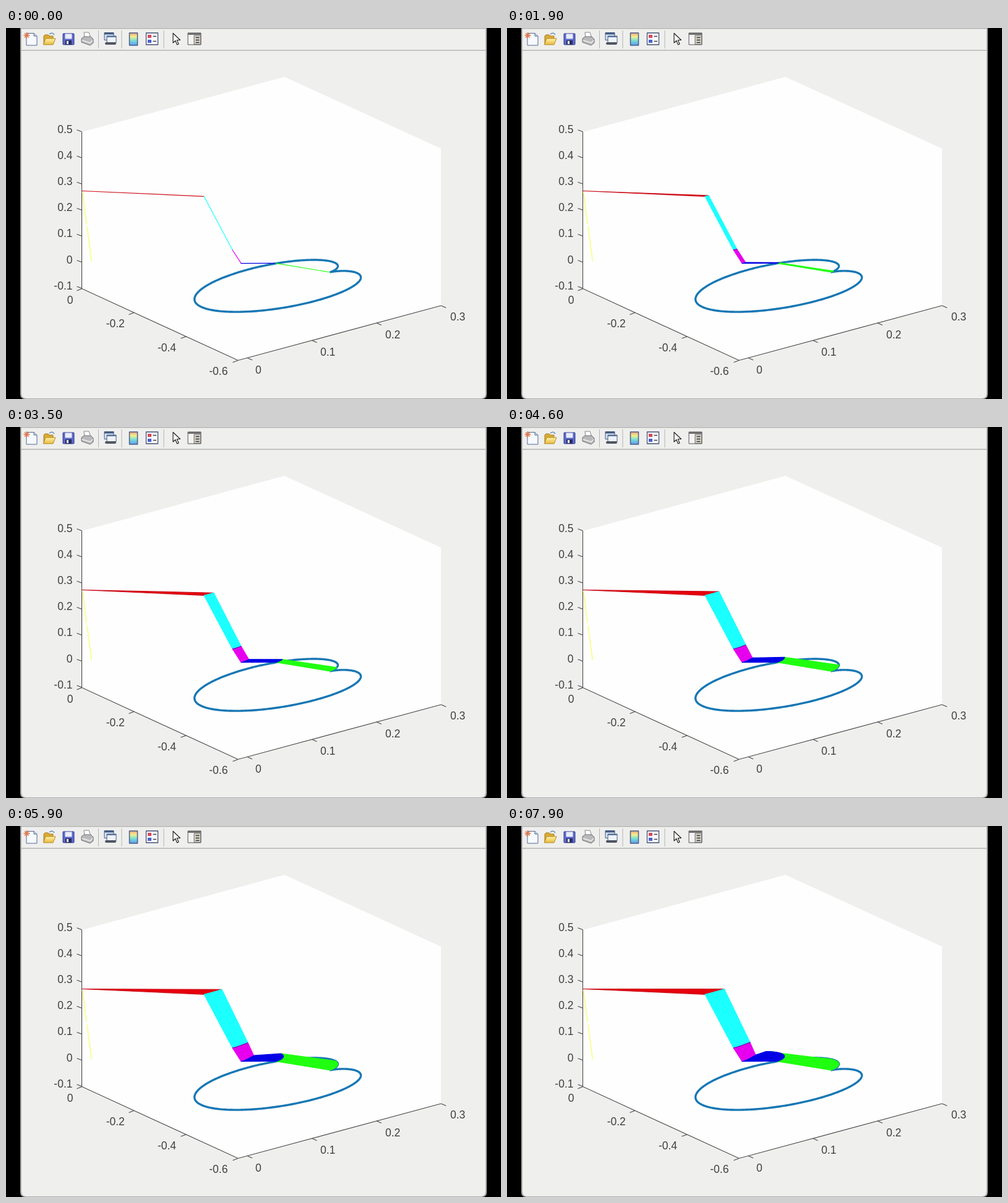
Animation of 800 by 600 pixels, one loop 8000 ms. Source, as an HTML page:

```html
<!DOCTYPE html>
<html lang="en">
<head>
<meta charset="utf-8">
<title>Robot arm plot</title>
<style>
  html, body { margin: 0; width: 100%; height: 100%; overflow: hidden; background: #000; }
  svg { display: block; }
  text { font: 17.5px "Liberation Sans", Arial, sans-serif; fill: #404040; }
</style>
</head>
<body>
<svg width="800" height="600" viewBox="0 0 800 600">
  <defs>
    <linearGradient id="rainbow" x2="0" y2="1">
      <stop stop-color="#f3a07c"/><stop offset=".3" stop-color="#f4f08c"/>
      <stop offset=".6" stop-color="#7fe0d0"/><stop offset="1" stop-color="#5b9cf0"/>
    </linearGradient>
    <linearGradient id="folder" x2="0" y2="1">
      <stop stop-color="#fff3a8"/><stop offset="1" stop-color="#e9b93c"/>
    </linearGradient>
  </defs>
  <rect width="800" height="600"/>
  <path d="M23 0H777V592Q777 600 769 600H31Q23 600 23 592Z" fill="#aaa"/>
  <path d="M25 0H775V591Q775 599 767 599H33Q25 599 25 591Z" fill="#efefee"/>
  <path d="M24 .8H776" stroke="#999"/>
  <path d="M25 36.2H775" stroke="#a9a9a9" stroke-width="1.3"/>
  <path d="M149.500 4V33M187 4V33M255 4V33" stroke="#b4b4b4"/>

  <g id="toolbar" stroke-linejoin="round">
    <path d="M33 8.500H45L50 13V28H33Z" fill="#f6faff" stroke="#52688f"/>
    <path d="M45 8.500V13H50" fill="#c8d6ee" stroke="#52688f"/>
    <path d="M33.500 7V17M28.500 12H38.500M30 8.500L37 15.500M37 8.500L30 15.500" stroke="#e0764a" stroke-width="1.4"/>
    <path d="M61 13L63 11H68L70 13H76V26H61Z" fill="#d9ab35" stroke="#a57c20"/>
    <path d="M64 17H80L76 27H60.500Z" fill="url(#folder)" stroke="#b48a28"/>
    <path d="M70 10Q75 6 78 11" fill="none" stroke="#6d8fb4" stroke-width="1.5"/>
    <rect x="92" y="9" width="18" height="18" rx="1" fill="#5c68c8" stroke="#343c92"/>
    <rect x="95.500" y="9.500" width="11" height="8" fill="#e8edfa"/>
    <rect x="96" y="20" width="10" height="7" fill="#292f60"/>
    <rect x="98" y="21" width="3" height="5" fill="#fff"/>
    <path d="M127 16L126 7H134L137 16Z" fill="#fff" stroke="#888"/>
    <path d="M122 17L126 14H137L141 18V24L136 28L122 23Z" fill="#b9b9bb" stroke="#707074"/>
    <path d="M123 20L136 24L140 20" fill="none" stroke="#efefef" stroke-width="1.5"/>
    <rect x="159" y="7.500" width="15" height="12" fill="#d7e2f2" stroke="#455c82"/>
    <path d="M159 9H174" stroke="#455c82" stroke-width="3"/>
    <rect x="163" y="13" width="15" height="11" fill="#eef3fa" stroke="#455c82"/>
    <path d="M163 14H178" stroke="#5a759f" stroke-width="2"/>
    <path d="M162 25H167M169 25H176" stroke="#4f5663" stroke-width="4" stroke-linecap="round"/>
    <rect x="199.500" y="8" width="13" height="20" fill="url(#rainbow)" stroke="#4a5d86" stroke-width="1.5"/>
    <rect x="226.500" y="8" width="19" height="19" fill="#f8faff" stroke="#445274" stroke-width="1.3"/>
    <rect x="229" y="11" width="6" height="5" fill="#d9485c"/>
    <rect x="229" y="19" width="6" height="5" fill="#4c5fd0"/>
    <path d="M237.500 13.500H243M237.500 21.500H243" stroke="#444" stroke-width="1.5"/>
    <path d="M270 8.500V24L273.800 20.500L276.500 27L279 26L276.300 19.500H281.500Z" fill="#fff" stroke="#222" stroke-width="1.2"/>
    <rect x="294" y="8" width="21" height="19" fill="#f4f4f4" stroke="#555"/>
    <path d="M294 9.500H315" stroke="#6b6b6b" stroke-width="3"/>
    <rect x="304" y="12" width="10.500" height="14.500" fill="#d8d4c8" stroke="#666"/>
    <path d="M306.500 15.500H312.500M306.500 19.500H312.500M306.500 23.500H312.500" stroke="#333" stroke-width="1.5"/>
  </g>

  <path d="M123 168L450 79L703 195V449L375 537L123 421Z" fill="#fefefe"/>
  <g id="axes" fill="none" stroke="#484848" stroke-width="1.1">
    <path d="M122.500 168V421.500L375 537.500L703 449"/>
  </g>
  <path d="M123.500 265L130.200 317M131 321L138.300 377" stroke="#f8ff8c" stroke-width="1.8"/>
  <path id="track" fill="none" stroke="#1777b4" stroke-width="3.4" stroke-linejoin="round"/>
  <g id="arm" stroke-width="1.2" stroke-linejoin="round"></g>
</svg>
<script>
const NS = "http://www.w3.org/2000/svg";
const LOOP = 8000, STEP = 100;
const byId = id => document.getElementById(id);

function add(parent, tag, attrs, text = "") {
  const node = document.createElementNS(NS, tag);
  for (const key in attrs) node.setAttribute(key, attrs[key]);
  node.textContent = text;
  parent.append(node);
  return node;
}

// Tick marks and labels
const axes = byId("axes"), svg = document.querySelector("svg");
function tick(x, y, dx, dy, label, lx, ly, anchor) {
  add(axes, "path", { d: `M${x} ${y}l${dx} ${dy}` });
  add(svg, "text", { x: lx, y: ly, "text-anchor": anchor }, label);
}
for (let i = 0; i < 7; i++) {
  const y = 421 - 42.2 * i, value = (i - 1) / 10;
  tick(122.5, y, -8, -3, String(value), 107.5, y + 1.7, "end");
}
for (let i = 0; i < 4; i++) {
  tick(123 + 84 * i, 421.5 + 38.7 * i, -8.5, 3.2, i ? `-0.${2 * i}` : "0", 108.5 + 83.3 * i, 446 + 38.3 * i, "end");
  tick(390 + 104.4 * i, 533.5 - 28.2 * i, 8, 3.5, i ? `0.${i}` : "0", 403 + 105 * i, 559 - 28.6 * i, "start");
}

// Cardioid lying on the plot floor, angle in degrees
const rad = deg => deg * Math.PI / 180;
function cardioid(deg) {
  const c = Math.cos(rad(deg)), s = Math.sin(rad(deg));
  const u = (1 - c) * c, v = (1 - c) * s;
  return [523.5 + 104 * u + 42 * v, 395 - 28 * u + 19.5 * v];
}
const toPath = points => "M" + points.map(p => p.map(n => n.toFixed(2)).join(" ")).join("L");
byId("track").setAttribute("d", toPath(Array.from({ length: 361 }, (_, i) => cardioid(i))));

// Joint positions from base to tool tip
function pose(deg) {
  const s = (1 - Math.cos(rad(2.45 * deg))) / 2;
  const tip = cardioid(-deg), p = deg / 79;
  return [
    [123, 263.5],
    [320 + 31.5 * s ** 0.9, 272.3 - 8.8 * s],
    [366 + 27 * s ** 0.85, 359 - 9.3 * s],
    [380 + 22 * s ** 0.75, 380.7 - 10.5 * s],
    [tip[0] - 88.5 + p, tip[1] - 14.7 + 4 * p],
    tip
  ];
}

// Each link leaves a filled sweep behind; later entries lie on top
const arm = byId("arm");
const links = [[0, "#e6000c", "#cc101c"], [1, "#1cffff"], [2, "#e600ee"], [4, "#20ff10"], [3, "#0000e6"]]
  .map(([joint, fill, stroke = fill]) => ({ joint, node: add(arm, "path", { fill, stroke }) }));
const elbow = add(arm, "path", { fill: "none", stroke: "#10207c", "stroke-width": 0.9 });

function draw(time) {
  const last = Math.floor(time % LOOP / STEP);
  const poses = Array.from({ length: last + 1 }, (_, i) => pose(i));
  const trail = joint => poses.map(p => p[joint]);
  for (const { joint, node } of links)
    node.setAttribute("d", toPath([...trail(joint), ...trail(joint + 1).reverse()]) + "Z");
  elbow.setAttribute("d", toPath(trail(2)));
}

const start = performance.now();
function frame() {
  draw(performance.now() - start);
  requestAnimationFrame(frame);
}
frame();
</script>
</body>
</html>
```
